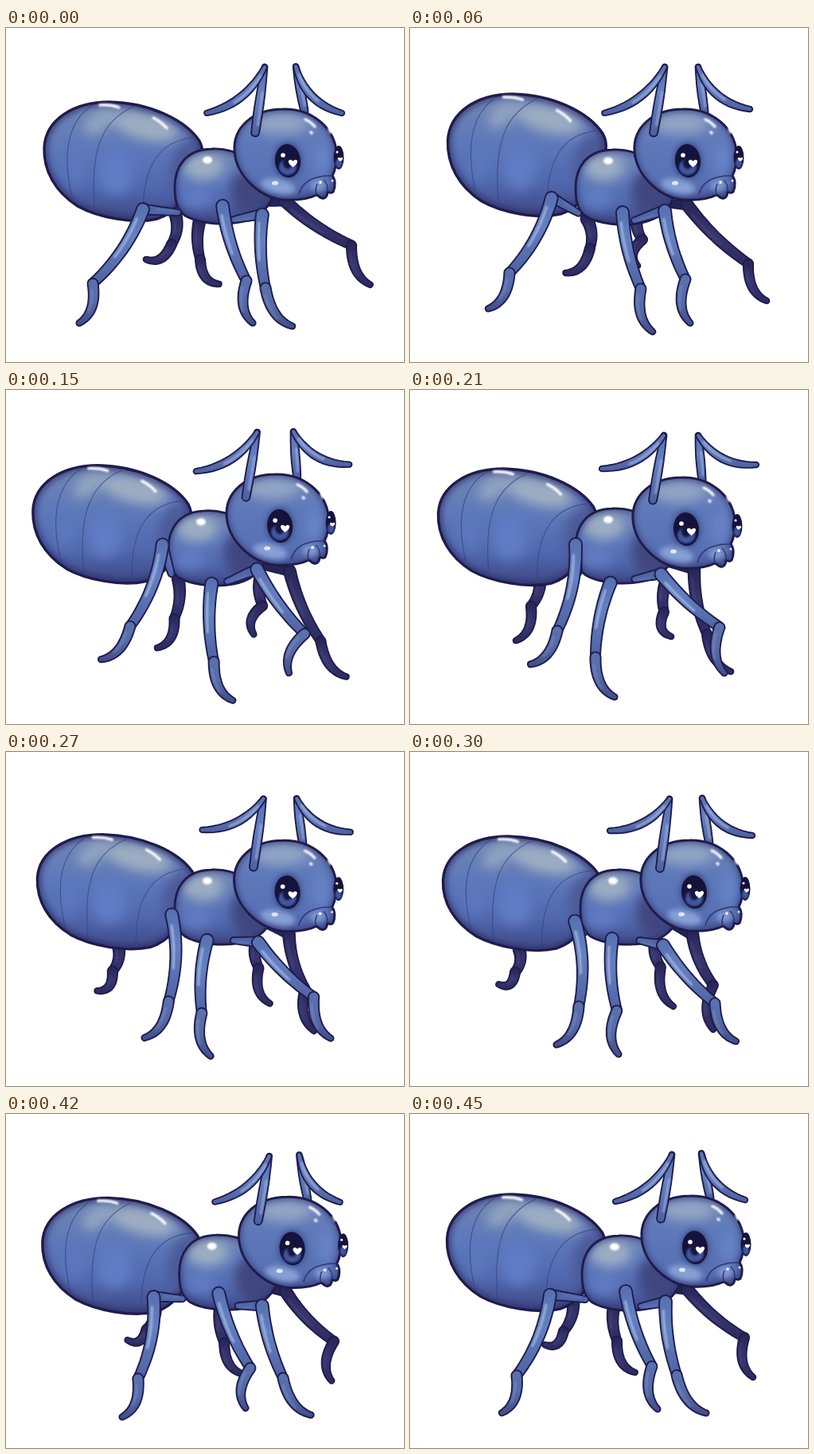
Write an HTML page that moves like this. It is 500 by 420 pixels and loops after 0.48 s.

```html
<!DOCTYPE html>
<html lang="en">
<head>
<meta charset="utf-8">
<title>Walking ant</title>
<style>
  html, body { margin: 0; width: 100%; height: 100%; overflow: hidden; background: #fff; }
  svg { display: block; width: 500px; height: 420px; }
  .ink { stroke: #1f1c4c; stroke-linejoin: round; }
  .seam { fill: none; stroke: #35447f; stroke-width: 1.2; opacity: .7; }
  .shine { fill: none; stroke: #fff; stroke-linecap: round; }
</style>
</head>
<body>
<svg viewBox="0 0 500 420" xmlns="http://www.w3.org/2000/svg">
  <defs>
    <filter id="soft" x="-60%" y="-60%" width="220%" height="220%"><feGaussianBlur stdDeviation="7"/></filter>
    <filter id="mist" x="-60%" y="-60%" width="220%" height="220%"><feGaussianBlur stdDeviation="3"/></filter>
    <filter id="glow" x="-60%" y="-60%" width="220%" height="220%"><feGaussianBlur stdDeviation="1"/></filter>
    <linearGradient id="bodyFill" x1="0" y1="0" x2="0" y2="1">
      <stop offset="0" stop-color="#7288b4"/><stop offset=".4" stop-color="#5d78ba"/>
      <stop offset=".72" stop-color="#5068ae"/><stop offset="1" stop-color="#3d4784"/>
    </linearGradient>
    <linearGradient id="headFill" x1="0" y1="0" x2="0" y2="1">
      <stop offset="0" stop-color="#7087b9"/><stop offset=".4" stop-color="#5d78b9"/>
      <stop offset=".8" stop-color="#5870b4"/><stop offset="1" stop-color="#4a5c9c"/>
    </linearGradient>
    <linearGradient id="nearFill" x1="0" y1="0" x2="0" y2="1">
      <stop offset="0" stop-color="#556fb0"/><stop offset=".4" stop-color="#6480c1"/><stop offset="1" stop-color="#4c60a0"/>
    </linearGradient>
    <linearGradient id="footFill" x1="0" y1="0" x2="0" y2="1">
      <stop offset="0" stop-color="#5a72ae"/><stop offset=".5" stop-color="#556ba8"/><stop offset="1" stop-color="#404c88"/>
    </linearGradient>
    <linearGradient id="farFill" x1="0" y1="0" x2="0" y2="1">
      <stop offset="0" stop-color="#262356"/><stop offset=".5" stop-color="#36356e"/><stop offset="1" stop-color="#2d2a60"/>
    </linearGradient>
    <path id="abShape" d="M48,150C50,115 85,93 130,93C180,94 225,115 243,142C250,155 247,168 238,185C228,210 215,232 190,240C160,247 115,238 90,224C62,206 47,180 48,150Z"/>
    <path id="thShape" d="M212,200C212,175 225,153 258,152C290,150 320,170 335,195C340,215 325,238 295,244C270,249 240,245 225,236C214,228 212,215 212,200Z"/>
    <path id="hdShape" d="M287,155C285,125 310,102 348,102C385,101 412,126 415,155C416,170 413,180 410,186C414,190 414,200 411,206C409,208 406,207 404,206C404,211 401,215 397,214C393,213 392,210 390,210C380,215 365,217 348,216C318,213 289,185 287,155Z"/>
    <clipPath id="abClip"><use href="#abShape"/></clipPath>
    <clipPath id="thClip"><use href="#thShape"/></clipPath>
    <clipPath id="hdClip"><use href="#hdShape"/></clipPath>
  </defs>

  <g id="far"></g>

  <g id="abdomen">
    <use href="#abShape" fill="url(#bodyFill)"/>
    <g clip-path="url(#abClip)">
      <g filter="url(#soft)">
        <ellipse cx="235" cy="185" rx="30" ry="45" fill="#4b5a98"/>
        <ellipse cx="138" cy="182" rx="22" ry="28" fill="#5f7bc4"/>
        <ellipse cx="88" cy="175" rx="14" ry="22" fill="#5c77bd"/>
        <ellipse cx="117" cy="118" rx="22" ry="12" transform="rotate(-38 117 118)" fill="#91a4c0"/>
        <ellipse cx="175" cy="124" rx="42" ry="16" transform="rotate(14 175 124)" fill="#9dadc2"/>
      </g>
      <use href="#abShape" fill="none" stroke="#2d2c66" stroke-width="11" opacity=".6" filter="url(#mist)"/>
      <path class="seam" d="M112,95C82,112 67,150 84,218M160,99C122,116 104,150 112,234M235,138C196,142 170,168 172,243"/>
    </g>
    <use href="#abShape" class="ink" fill="none" stroke-width="3.4"/>
    <g filter="url(#glow)"><path class="shine" stroke-width="3.4" d="M118,97Q131,96 142,100M185,113Q195,118 202,126"/></g>
  </g>

  <g id="thorax">
    <use href="#thShape" fill="url(#bodyFill)"/>
    <g clip-path="url(#thClip)">
      <g filter="url(#soft)">
        <ellipse cx="248" cy="174" rx="26" ry="17" fill="#9badc2"/>
        <ellipse cx="240" cy="212" rx="18" ry="14" fill="#607cc2"/>
        <ellipse cx="312" cy="212" rx="28" ry="36" transform="rotate(-30 312 212)" fill="#3f4780"/>
      </g>
      <use href="#thShape" fill="none" stroke="#2d2c66" stroke-width="7" opacity=".55" filter="url(#mist)"/>
    </g>
    <use href="#thShape" class="ink" fill="none" stroke-width="2.8"/>
    <ellipse cx="253" cy="166" rx="6" ry="4.5" fill="#fff" filter="url(#glow)"/>
  </g>

  <g id="near"></g>
  <g id="backFeeler"></g>

  <g id="head">
    <use href="#hdShape" fill="url(#headFill)"/>
    <g clip-path="url(#hdClip)">
      <g filter="url(#soft)">
        <ellipse cx="345" cy="120" rx="34" ry="13" fill="#92a5c4"/>
        <ellipse cx="396" cy="165" rx="10" ry="22" fill="#6784c6"/>
      </g>
      <use href="#hdShape" fill="none" stroke="#2d2c66" stroke-width="8" opacity=".5" filter="url(#mist)"/>
      <g filter="url(#mist)">
        <ellipse cx="342" cy="199" rx="22" ry="9" transform="rotate(12 342 199)" fill="#86a0d6"/>
        <ellipse cx="392" cy="198" rx="10" ry="7" fill="#7f99d0"/>
        <ellipse cx="354" cy="167" rx="18" ry="24" fill="#2e3670" opacity=".6"/>
      </g>
    </g>
    <use href="#hdShape" class="ink" fill="none" stroke-width="3"/>
    <path fill="none" stroke="#2f3670" stroke-width="1.5" d="M368,209Q373,192 390,188Q401,185 410,186M390,210Q388,202 391,196M404,206Q405,196 399,191"/>
    <ellipse cx="354" cy="167" rx="16" ry="21" transform="rotate(-6 354 167)" fill="#15133c"/>
    <ellipse cx="354" cy="175" rx="11" ry="10" fill="#3f579f" filter="url(#glow)"/>
    <ellipse cx="354" cy="169" rx="6" ry="8" fill="#15133c" filter="url(#glow)"/>
    <ellipse cx="418" cy="163" rx="6.5" ry="15" fill="#15133c"/>
    <ellipse cx="418" cy="170" rx="4" ry="6" fill="#3f579f" filter="url(#glow)"/>
    <g id="sparks" fill="#fff">
      <circle cx="348" cy="160" r="2.8"/><circle cx="416" cy="156" r="1.6"/>
      <circle cx="395" cy="194" r="2" opacity=".8"/><circle cx="410" cy="192" r="1.6" opacity=".8"/>
      <ellipse cx="338" cy="195" rx="4" ry="2.6" opacity=".75"/>
    </g>
    <g filter="url(#glow)"><path class="shine" stroke-width="3.4" d="M376,115Q383,118 388,124M383,131l1,1M406,127l2,4"/></g>
  </g>
  <g id="frontFeeler"></g>
</svg>

<script>
const LOOP = 480, STEP = 30;
const TIMES = [0, 60, 120, 210, 300, 360, 450];
const $ = id => document.getElementById(id);

// Body shifts: x, y (the abdomen adds its height)
const BODY = {
  abdomen: [[0, 93, 150], [-.5, 83, 154], [-13, 92, 150], [-12.5, 99, 147], [-6.5, 106, 144], [-3.5, 111, 146], [-1.5, 101, 147]],
  thorax: [[0, 0], [-4, 1], [-9, 1], [-4, -3], [2, -4], [7, -2], [4, 1]],
  head: [[0, 0], [-5, 0], [-10, 2], [-7, 8], [3, 9], [7, 5], [4, 1]]
};

// Limb poses: root, joint, tip
const farHind = [
  [213, 235, 208, 272, 176, 291], [222, 240, 226, 277, 195, 308], [237, 240, 236, 292, 212, 325],
  [163, 235, 152, 272, 133, 315], [137, 248, 132, 277, 111, 292], [152, 253, 146, 267, 120, 275], [205, 235, 193, 273, 169, 290]];
const farMid = [
  [243, 243, 244, 291, 268, 322], [285, 238, 292, 266, 286, 299], [314, 236, 320, 267, 302, 306],
  [322, 240, 319, 279, 328, 310], [308, 243, 315, 270, 331, 320], [294, 248, 300, 292, 325, 329], [256, 243, 260, 285, 283, 325]];
const farFront = [
  [350, 217, 434, 273, 458, 323], [348, 222, 425, 296, 448, 343], [355, 228, 408, 316, 439, 361],
  [357, 225, 373, 307, 403, 354], [355, 230, 381, 293, 381, 349], [358, 228, 398, 293, 374, 343], [348, 220, 420, 281, 431, 331]];
const nearHind = [
  [172, 228, 109, 321, 92, 371], [178, 213, 125, 308, 98, 353], [190, 197, 142, 297, 106, 339],
  [208, 194, 185, 303, 151, 345], [207, 212, 212, 320, 184, 368], [204, 232, 222, 336, 200, 387], [176, 227, 134, 329, 115, 376]];
const nearMid = [
  [272, 223, 302, 318, 310, 371], [267, 232, 290, 328, 305, 382], [262, 242, 277, 342, 299, 391],
  [252, 242, 233, 336, 257, 386], [254, 234, 260, 325, 262, 380], [259, 231, 306, 325, 278, 369], [271, 223, 304, 317, 311, 371]];
const nearFront = [
  [322, 234, 326, 327, 360, 375], [320, 229, 346, 316, 352, 371], [316, 224, 366, 312, 340, 358],
  [315, 231, 389, 298, 395, 356], [318, 243, 383, 316, 410, 364], [323, 250, 373, 336, 403, 381], [321, 236, 335, 328, 372, 376]];
const feelerL = [
  [313, 132, 325, 49, 252, 107], [306, 132, 320, 49, 244, 107], [301, 133, 315, 51, 239, 104],
  [305, 139, 319, 57, 241, 99], [314, 146, 326, 59, 251, 99], [319, 140, 332, 57, 267, 109], [315, 132, 329, 51, 258, 110]];
const feelerR = [
  [375, 105, 364, 48, 422, 107], [370, 106, 362, 49, 427, 102], [366, 107, 361, 50, 429, 95],
  [367, 114, 362, 57, 435, 94], [376, 116, 367, 58, 430, 105], [381, 111, 372, 56, 419, 115], [377, 106, 366, 49, 421, 108]];

// Periodic cubic through the poses
function pose(rows, t) {
  const n = TIMES.length;
  let i = n - 1;
  while (TIMES[i] > t) i--;
  const time = k => TIMES[(k + n) % n] + LOOP * Math.floor(k / n);
  const row = k => rows[(k + n) % n];
  const span = time(i + 1) - time(i), u = (t - time(i)) / span, v = 1 - u;
  return row(i).map((a, j) => {
    const b = row(i + 1)[j];
    const m0 = (b - row(i - 1)[j]) / (time(i + 1) - time(i - 1)) * span;
    const m1 = (row(i + 2)[j] - a) / (time(i + 2) - time(i)) * span;
    return a * (1 + 2 * u) * v * v + m0 * u * v * v + b * u * u * (3 - 2 * u) - m1 * u * u * v;
  });
}

const fmt = p => p[0].toFixed(1) + ' ' + p[1].toFixed(1);

// Tapered limb bowed sideways; at = where along the chord the bow sits
function limb(a, b, { bow = 0, at = .5, r0, r1, belly = 0 }) {
  const dx = b[0] - a[0], dy = b[1] - a[1], len = Math.hypot(dx, dy) || 1;
  const c = [a[0] + dx * at - dy / len * bow, a[1] + dy * at + dx / len * bow];
  const point = (u, side) => {
    const v = 1 - u, r = (r0 + (r1 - r0) * u + belly * Math.sin(Math.PI * u)) * side;
    const tx = v * (c[0] - a[0]) + u * (b[0] - c[0]), ty = v * (c[1] - a[1]) + u * (b[1] - c[1]);
    const l = Math.hypot(tx, ty) || 1;
    return [0, 1].map(k => v * v * a[k] + 2 * u * v * c[k] + u * u * b[k] + (k ? tx : -ty) / l * r);
  };
  const line = (from, to, side) => Array.from({ length: 15 }, (_, i) => fmt(point(from + (to - from) * i / 14, side))).join('L');
  return {
    shape: `M${line(0, 1, 1)}A${r1} ${r1} 0 0 0 ${line(1, 0, -1)}A${r0} ${r0} 0 0 0 ${fmt(point(0, 1))}Z`,
    glint: side => 'M' + line(.12, .62, side)
  };
}

function add(parent, attrs) {
  const e = document.createElementNS('http://www.w3.org/2000/svg', 'path');
  for (const k in attrs) e.setAttribute(k, attrs[k]);
  return $(parent).appendChild(e);
}

function part(layer, fill, shine, side = .35) {
  const skin = add(layer, { class: 'ink', fill, 'stroke-width': 1.9 });
  const gleam = add(layer, { fill: 'none', stroke: '#b4c6e6', 'stroke-width': 2.6, 'stroke-linecap': 'round', opacity: shine, filter: 'url(#glow)' });
  return (a, b, style) => {
    const l = limb(a, b, style);
    skin.setAttribute('d', l.shape);
    gleam.setAttribute('d', l.glint(side));
  };
}

function leg(layer, rows, dir, bow, root) {
  const near = layer === 'near';
  const coxa = root && part(layer, near ? '#4f66a8' : '#262356', near ? .15 : 0);
  const thigh = part(layer, near ? 'url(#nearFill)' : 'url(#farFill)', near ? .8 : .1);
  const foot = part(layer, near ? 'url(#footFill)' : 'url(#farFill)', near ? .25 : .08);
  const k = near ? 1 : .93;
  return (t, shift) => {
    const p = pose(rows, t), hip = p.slice(0, 2), ankle = p.slice(2, 4), tip = p.slice(4);
    if (coxa) coxa([root[0] + shift[0], root[1] + shift[1]], hip, { r0: 4, r1: 6.5 });
    thigh(hip, ankle, { bow: bow * dir, r0: 8 * k, r1: 6 * k });
    foot(ankle, tip, { bow: 17 * dir, at: .62, r0: 6.6 * k, r1: 3.6 * k, belly: .6 });
  };
}

function feeler(stalkLayer, whipLayer, rows, bow, r) {
  const stalk = part(stalkLayer, 'url(#nearFill)', .6);
  const whip = part(whipLayer, 'url(#nearFill)', .7, -.2);
  return t => {
    const p = pose(rows, t), elbow = p.slice(2, 4);
    stalk(p.slice(0, 2), elbow, { r0: r, r1: 3.4, belly: 1.2 });
    whip(elbow, p.slice(4), { bow, r0: 3, r1: 3.2, belly: 1.8 });
  };
}

function heart(x, y, s) {
  const q = (i, j) => fmt([x + i * s, y + j * s]);
  add('sparks', { d: `M${q(0, 1)}C${q(-2, -.3)} ${q(-.9, -1.4)} ${q(0, -.5)}C${q(.9, -1.4)} ${q(2, -.3)} ${q(0, 1)}Z` });
}
heart(360.5, 170, 5);
heart(420, 165, 2.8);

const movers = [
  leg('far', farHind, -1, 8),
  leg('far', farMid, 1, 6),
  leg('far', farFront, 1, 9, [325, 220]),
  leg('near', nearHind, -1, 14, [216, 232]),
  leg('near', nearFront, 1, 8, [286, 241]),
  leg('near', nearMid, 1, 9),
  feeler('backFeeler', 'backFeeler', feelerR, 24, 4.6),
  feeler('frontFeeler', 'frontFeeler', feelerL, -22, 5)
];

function draw(ms) {
  const t = Math.floor(ms % LOOP / STEP) * STEP;
  const [ax, ay, ah] = pose(BODY.abdomen, t);
  const shift = pose(BODY.thorax, t);
  $('abdomen').setAttribute('transform', `translate(${ax} ${ay}) scale(1 ${ah / 150}) translate(0 -93)`);
  $('thorax').setAttribute('transform', `translate(${shift})`);
  $('head').setAttribute('transform', `translate(${pose(BODY.head, t)})`);
  movers.forEach(move => move(t, shift));
}

const start = performance.now();
function tick() {
  draw(performance.now() - start);
  requestAnimationFrame(tick);
}
tick();
</script>
</body>
</html>
```
